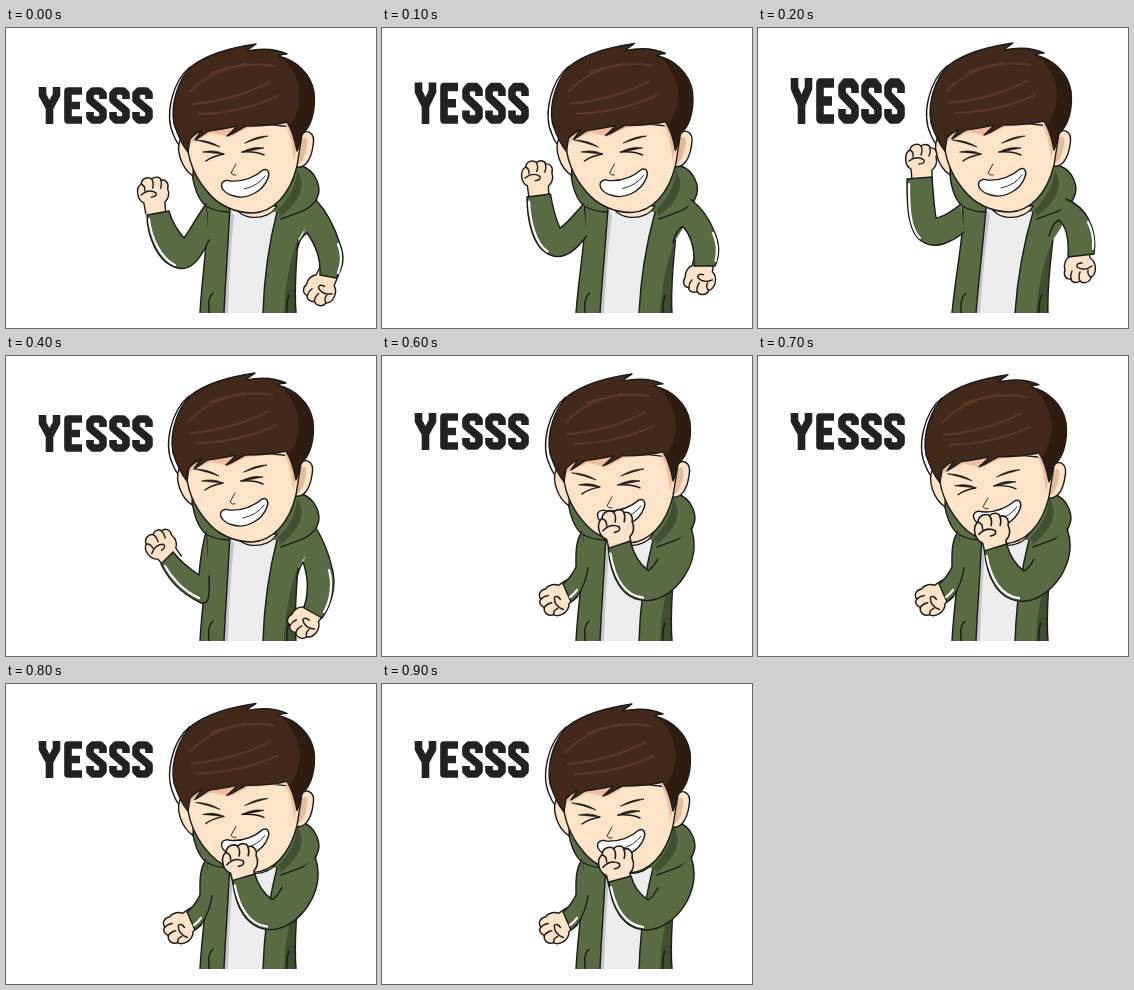
These frames come from a looping animation (370x300 px, 1000 ms). An HTML page:

```html
<!DOCTYPE html>
<html lang="en">
<head>
<meta charset="utf-8">
<title>Cheering boy</title>
<style>
  html, body { margin: 0; width: 100%; height: 100%; overflow: hidden; background: #fff; }
  svg { display: block; width: 370px; height: 300px; }
  path { fill: none; stroke: #1a1a1a; stroke-width: 1.4; stroke-linejoin: round; stroke-linecap: round; }
  .green { fill: #586b43; }
  .dark { fill: #3f4f2f; stroke: none; }
  .skin { fill: #fde3c8; }
  .shade { fill: #f2bd9c; stroke: none; }
  .tan { fill: #e3bd9b; stroke: none; }
  .white { fill: #fff; }
  .shirt { fill: #eceeee; stroke: none; }
  .gray { fill: #c3c7c9; stroke: none; }
  .hair { fill: #422818; }
  .hairDark { fill: #2f1c11; stroke: none; }
  .strand { stroke: #5c3825; stroke-width: 2; }
  .shine { stroke: #fff; stroke-width: 2.2; }
  .plain { stroke: none; }
  .brow { fill: #1f1410; stroke-width: .7; }
  .letter { stroke: #222; stroke-width: 7.6; stroke-linecap: butt; }
  .fine { stroke-width: .9; }
</style>
</head>
<body>
<svg viewBox="0 0 370 300">
  <defs>
    <g id="fist">
      <path class="skin" d="M-9 20 L-10 9 C-17 5 -17 -7 -11 -10 C-10 -16 -3 -17 0 -14 C4 -17 9 -15 9 -12 C14 -13 17 -8 15 -3 C17 3 14 8 11 10 L11 20"/>
      <path d="M-11 -10 Q-7 -8 -8 -3 M0 -14 Q2 -10 0 -5 M9 -12 Q10 -8 8 -4 M-12 1 Q-4 -5 3 0 Q4 4 -2 4"/>
    </g>
    <path id="s" class="letter" d="M97 71 V66 L94 63 H87 L84 66 V72 L97 83 V89 L94 92 H87 L84 89 V84"/>
    <clipPath id="floor"><path d="M0 0 H370 V285 H0 Z"/></clipPath>
  </defs>

  <g id="text" role="img" aria-label="YESSS">
    <path class="letter" d="M36.5 59 V67 L43.5 80 L50.5 67 V59 M43.5 78 V96"/>
    <path class="letter" d="M76 63 H62 V92 H76 M62 77.5 H74"/>
    <use href="#s"/><use href="#s" x="23"/><use href="#s" x="46"/>
  </g>

  <g id="boy" clip-path="url(#floor)">
    <g id="torso">
      <path class="green plain" d="M186 140 C186 155 192 172 200 178 C204 200 196 245 194 285 H290 C288 260 290 240 292 212 C300 200 308 185 311 172 C317 158 308 142 296 138 Z"/>
      <path class="dark" d="M272 182 C284 170 291 156 291 142 C301 156 294 174 275 188 Z"/>
      <path class="dark" d="M291 214 C283 235 279 260 278 285 H290 C288 260 290 240 291 214 Z"/>
      <path class="shirt" d="M224 178 C222 220 219 260 218 285 H257 C258 250 263 215 271 184 Z"/>
      <path class="gray" d="M224 180 C222 220 219 260 218 285 H222 C223 250 225 215 228 188 Z"/>
      <path class="skin" d="M228 176 C232 193 262 194 271 178 Z"/>
      <path d="M186 140 C186 155 192 172 200 178 C204 200 196 245 194 285 M290 285 C288 260 290 240 292 212 M296 138 C308 142 317 158 311 170 C306 182 290 185 275 191 M200 178 Q210 184 224 184 M224 178 C222 220 219 260 218 285 M271 184 C263 215 258 250 257 285 M203 285 C202 274 203 269 207 265 M281 285 Q280 274 283 267"/>
    </g>

    <g id="head">
      <path class="white" d="M184 39 C166 54 158 88 168 108 Q171 116 176 120"/>
      <path class="skin" d="M174 112 C170 122 175 140 187 148 L188 118"/>
      <path class="skin" d="M290 112 C299 98 310 103 307 118 C305 132 299 141 289 139"/>
      <path class="tan" d="M291 117 C297 107 303 107 301 118 C299 129 296 136 290 137 Z"/>
      <path class="skin" d="M182 112 C180 130 190 150 200 162 C212 178 230 185 247 185 C267 184 284 167 291 138 L297 100 L200 90 Z"/>
      <path class="shade" d="M184 115 L206 105 L224 109 L242 100 L279 96 Q287 112 288 134 L294 105 L270 88 L190 95 Z"/>
      <path class="hair" d="M182 124 C177 118 172 108 168 96 C164 75 173 50 186 38 C202 26 222 20 250 16 C246 19 243 20 241 23 C256 20 268 20 281 26 Q276 26 272 28 C290 32 305 46 308 64 C310 82 305 96 300 102 L295 108 Q294 117 291 123 C289 112 285 100 281 94 C266 98 252 98 240 98 C234 101 229 105 221 108 Q228 102 231 98 C218 101 208 102 203 103 C198 106 194 109 189 112 Q194 105 196 102 Q188 106 184 111 Z"/>
      <path class="hairDark" d="M276 29 C292 34 305 48 308 64 C310 82 305 96 300 102 L295 108 L291 121 Q289 106 284 98 C299 76 297 50 276 29 Z"/>
      <path class="strand" d="M184 64 Q205 42 240 36 M205 45 Q240 33 267 38 M186 76 Q230 72 264 54 M192 86 Q235 85 272 68"/>
      <g id="face">
        <path class="brow" d="M190 112 Q203 112 214 119 Q203 115 190 112 Z M239 115 Q250 108 262 108 Q250 111 239 115 Z"/>
        <path class="brow" d="M197 124 Q208 121 218 126 Q208 125 197 124 Z M236 124 Q247 118 258 120 Q248 122 236 124 Z"/>
        <path d="M218 126 Q207 128 200 133 M236 124 Q249 123 258 127"/>
        <path d="M230 136 L225 145 Q227 148 230 147" class="fine"/>
      </g>
      <path class="white" d="M216 155 C218 152 222 152 224 153 C238 154 250 148 257 142 C262 140 264 145 262 150 C257 164 240 172 228 168 C219 166 214 160 216 155 Z"/>
      <path class="fine" d="M238 161 Q252 158 259 148"/>
    </g>

    <use id="leftFist" href="#fist"/>
    <path id="leftArm" class="green"/>
    <path id="leftShine" class="shine"/>
    <use id="rightFist" href="#fist"/>
    <path id="rightArm" class="green"/>
    <path id="rightShine" class="shine"/>
  </g>

  <path id="whoosh" class="fine" d="M131 247 Q139 260 151 265 M136 242 Q145 255 158 262 M142 239 Q150 250 161 256 M222 234 Q245 257 281 262 M228 246 Q252 265 287 268 M232 236 Q252 252 276 255"/>
</svg>

<script>
const part = id => document.getElementById(id);
const hand = (x, y, turn, size = 1) => `translate(${x} ${y}) rotate(${turn}) scale(${size})`;
const move = (x, y) => `translate(${x} ${y})`;
const lean = k => `matrix(1 0 ${-k} 1 ${285 * k} 0)`;
const tall = (base, s) => `translate(0 ${base}) scale(1 ${s}) translate(0 -96)`;

const ready = {
  leftArm: "M200 176 C190 190 184 202 178 210 C171 202 166 194 163 183 L141 187 C141 205 150 235 172 240 C186 244 196 228 203 212",
  leftShine: "M143 191 C145 210 155 231 169 237",
  leftFist: hand(147, 165, -5),
  rightArm: "M291 222 C293 212 297 207 301 205 C309 216 315 230 314 247 L330 250 C339 238 338 226 334 216 C329 200 322 185 310 172",
  rightShine: "M332 245 C336 235 336 225 332 216",
  rightFist: hand(315, 261, -152),
  head: move(0, 0), face: move(0, 0), torso: lean(0), text: tall(96, 1)
};
const cheer = {
  leftArm: "M203 176 C194 183 186 189 178 190 C176 178 175 162 174 149 L149 151 C149 170 148 205 165 214 C178 222 194 214 206 204",
  leftShine: "M151 156 C151 175 151 200 162 210",
  leftFist: hand(163, 132, 0),
  rightArm: "M291 208 C293 200 297 194 301 192 C308 198 311 212 310 229 L336 226 C338 214 336 202 331 192 C326 182 318 175 308 171",
  rightShine: "M335 221 C336 212 334 202 330 194",
  rightFist: hand(322, 239, -180),
  head: move(5, -1), face: move(0, 1), torso: lean(0.04), text: tall(96, 1.24)
};
const swing = {
  leftArm: "M200 176 C196 190 194 206 193 219 C184 213 174 205 167 196 L155 208 C162 222 172 236 195 247 C205 249 203 235 203 220",
  leftShine: "M159 210 C165 221 177 235 193 242",
  leftFist: hand(155, 190, -35),
  rightArm: "M291 222 C292 214 294 210 297 206 C302 220 303 236 298 252 L316 262 C326 248 331 228 326 212 C323 198 318 185 310 172",
  rightShine: "M318 256 C325 244 327 228 323 214",
  rightFist: hand(299, 266, -139),
  head: move(-1, 1), face: move(0, 0), torso: lean(0), text: tall(96, 1)
};
const giggle = {
  leftArm: "M200 176 C193 185 194 200 194 211 C191 217 186 224 181 228 L189 246 C193 243 197 239 199 234 C203 226 205 220 206 212",
  leftShine: "M188 241 C191 239 193 237 195 234",
  leftFist: hand(174, 244, -123),
  rightArm: "M276 202 C272 209 269 213 266 214 C256 206 251 195 248 182 L226 190 C228 220 240 245 266 244 C292 243 322 205 309 172",
  rightShine: "M228 195 C232 220 242 239 261 241",
  rightFist: hand(234, 168, -9, 1.12),
  head: move(0, 1), face: move(0, 3), torso: lean(0), text: tall(94, 1)
};
const settle = {
  ...giggle,
  rightArm: "M276 204 C272 211 269 215 266 216 C256 209 252 202 249 192 L227 198 C229 222 240 246 266 246 C292 245 322 207 309 173",
  rightShine: "M229 203 C233 223 243 241 261 243",
  rightFist: hand(234, 180, -9, 1.12),
  head: move(0, 4)
};

// One entry per 100 ms: start pose, end pose, blend, blur
const steps = [
  [ready], [ready, cheer, 0.5, 0.5], [cheer], [cheer], [swing, swing, 0, 0.6],
  [giggle], [giggle, settle, 0.3], [giggle, settle, 0.6], [giggle, settle, 0.8], [settle]
];

function mix(a, b, k) {
  const ends = b.match(/-?[\d.]+/g);
  let i = 0;
  return a.replace(/-?[\d.]+/g, n => +n + (ends[i++] - n) * k);
}

function draw(now) {
  const step = Math.floor(now / 100) % steps.length;
  const [from, to = from, k = 0, blur = 0] = steps[step];
  for (const id in from) {
    const attribute = /Arm|Shine/.test(id) ? "d" : "transform";
    part(id).setAttribute(attribute, mix(from[id], to[id], k));
  }
  part("boy").style.filter = blur ? `blur(${blur}px)` : "none";
  part("whoosh").style.display = step === 5 ? "" : "none";
}

const start = performance.now();
function tick() {
  draw(performance.now() - start);
  requestAnimationFrame(tick);
}
tick();
</script>
</body>
</html>
```
